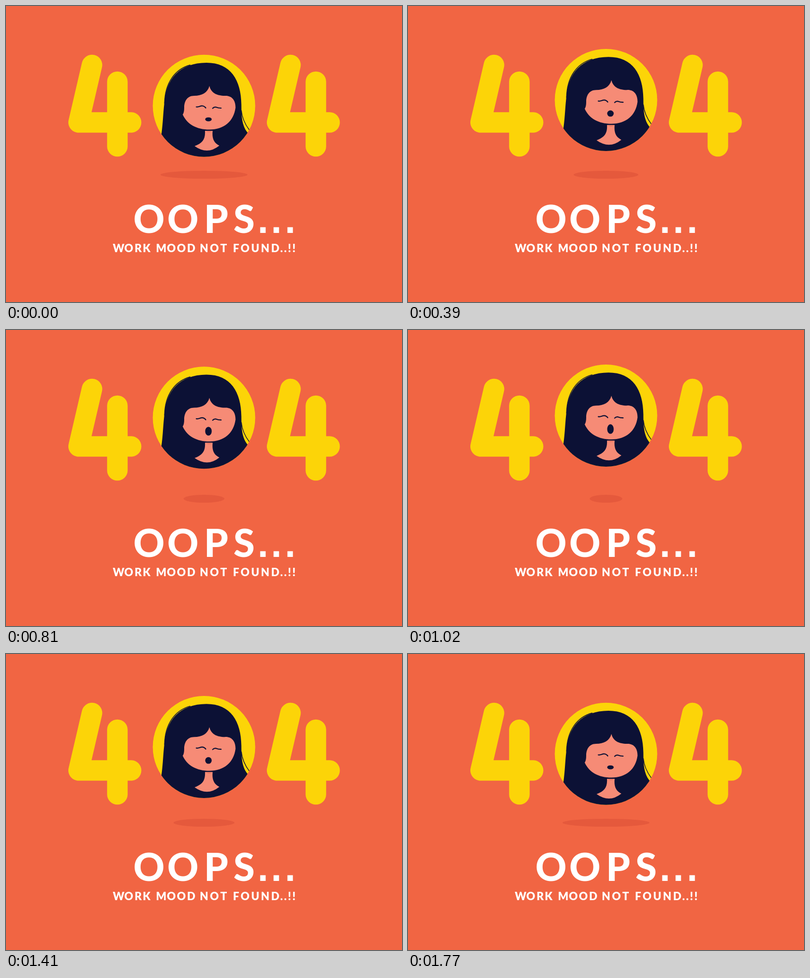
An HTML page that plays this animation: 800x600 px, repeating every 1950 ms.

```html
<!DOCTYPE html>
<html lang="en">
<head>
<meta charset="utf-8">
<title>404</title>
<style>
  html, body { margin: 0; width: 100%; height: 100%; overflow: hidden; background: #f16543; }
  svg { display: block; width: 800px; height: 600px; }
  text { fill: #fff; font-family: Lato, sans-serif; font-weight: 900; }
  .title { font-size: 78px; font-weight: 800; text-anchor: middle; }
  .dots { font-family: "Liberation Sans", Arial, sans-serif; font-weight: 700; }
  .line { font-size: 22px; }
  .spread { text-anchor: middle; }
  .ink { fill: none; stroke: #0c1135; stroke-linecap: round; }
</style>
</head>
<body>
<svg viewBox="0 0 800 600">
  <defs>
    <path id="four" d="M173.7 119.5 L146.7 236 H252.7 M225 153.5 V284.5"
      fill="none" stroke="#fcd408" stroke-width="41.5" stroke-linecap="round" stroke-linejoin="round"/>
    <clipPath id="disc"><circle cx="400" cy="202.3" r="103.5"/></clipPath>
  </defs>

  <use href="#four"/>
  <use href="#four" x="401"/>
  <ellipse id="shadow" cx="400" cy="342" rx="88" ry="8" fill="#e5593c"/>

  <g id="head">
    <g clip-path="url(#disc)">
      <circle cx="400" cy="202.3" r="104" fill="#fcd408"/>
      <!-- hair and loose strands -->
      <path fill="#0c1135" d="M312 272 C317 245 317 222 319.500 200 C322 148 351 115 405 115
        C454 115 475 150 475.500 200 C475.500 226 477 244 489 258 L496 310 H312 Z"/>
      <path class="ink" stroke-width="1.4" d="M372 119.500 C341 128 321 156 320.300 197"/>
      <path class="ink" stroke-width="1.4" d="M475.500 212 C477 228 483 240 492 252"/>
      <!-- neck and face -->
      <path fill="#f68b76" d="M402 253 C403 270 397 278 381 284 Q407 302.500 431 283
        C419 277 416 267 417.500 253 Z"/>
      <path fill="#e87863" d="M403 253 H416 Q411 259 403 253 Z"/>
      <path fill="#f68b76" d="M411 162 C407 176 396 182 380 182
        C366 182 360 193 360 206 Q360 216 357 220 C366 240 385 250.500 411 250.500
        C440 250.500 460 234 463.700 206 C464 190 455 181 442 182 C426 182 414 176 411 162 Z"/>
      <path class="ink" stroke-width="2.2" d="M384.500 204.500 C390 205.500 392 202 397 202.500 Q401 203 403.500 206.500
        M417.500 207.500 Q420 204.500 424 205 Q429 207 434.500 207"/>
      <ellipse id="mouth" cx="409" cy="229.7" rx="6.6" ry="4" fill="#0c1135"/>
    </g>
  </g>

  <text class="title" x="289 357.5 424.5 481" y="460">OOPS</text>
  <text class="title dots" x="519 546 574" y="460">...</text>
  <text class="line spread" x="227.5 248 267 284" y="499">WORK</text>
  <text class="line spread" x="313.5 334 354.3 374" y="499">MOOD</text>
  <text class="line" y="499">
    <tspan x="391.5" letter-spacing="3.4">NOT</tspan>
    <tspan x="458.5" letter-spacing="3.3">FOUND</tspan>
    <tspan x="554" letter-spacing="2.5">..!!</tspan>
  </text>
</svg>
<script>
  const LOOP = 1950, STEP = 30, PEAK = 990, LANDED = 1770, HEIGHT = 30;
  const [head, mouth, shadow] = ["head", "mouth", "shadow"].map(id => document.getElementById(id));

  // Linear rise, faster linear fall, then a short rest.
  const liftAt = t => t < PEAK ? t / PEAK : Math.max(0, (LANDED - t) / (LANDED - PEAK));

  function draw() {
    const t = Math.floor(performance.now() % LOOP / STEP) * STEP;
    const lift = liftAt(t);
    head.setAttribute("transform", `translate(0 ${-HEIGHT * lift})`);
    mouth.setAttribute("ry", 4 + 6 * lift);
    shadow.setAttribute("rx", 88 * (1 - 0.65 * lift));
    requestAnimationFrame(draw);
  }
  draw();
</script>
</body>
</html>
```
